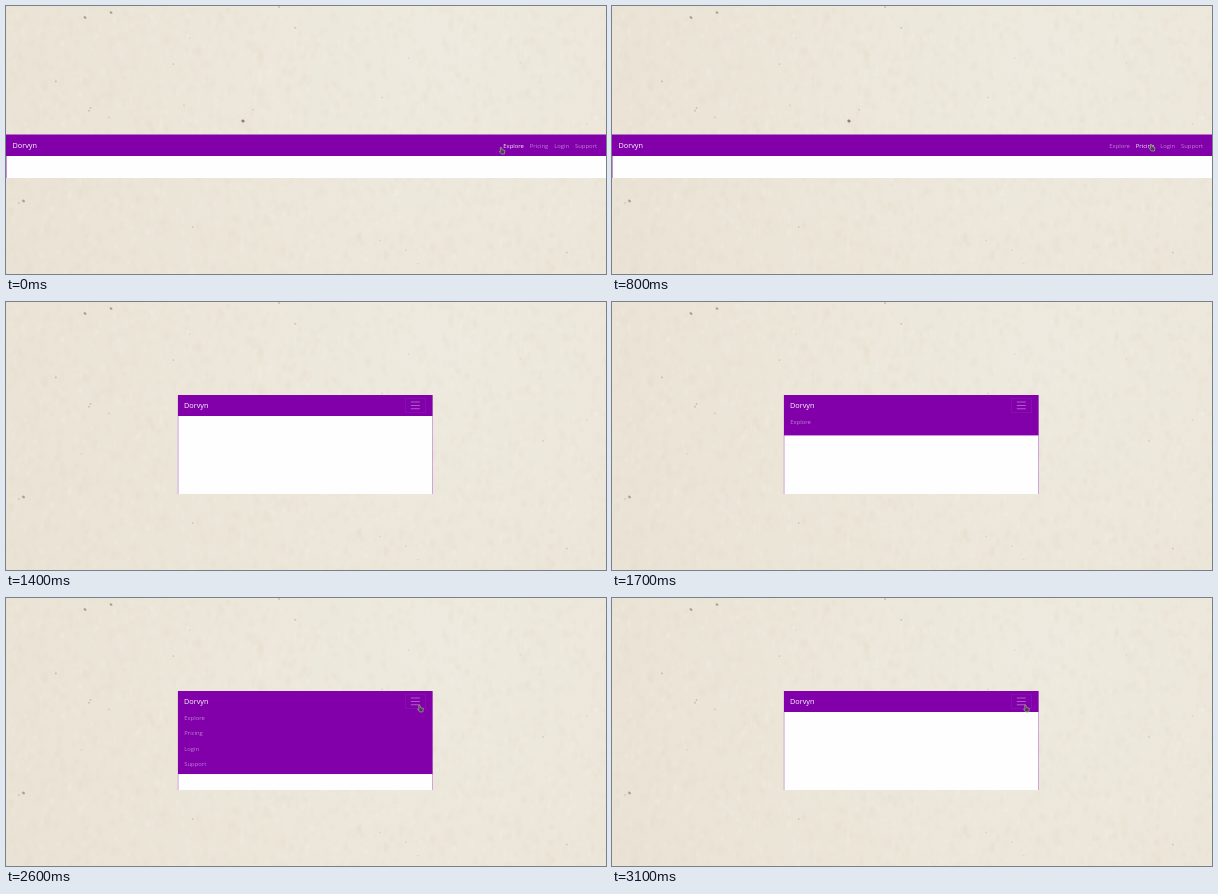
Recreate the animation shown at these times as an HTML page with a canvas. Size 600x268 px, loop 3.2 s.

```html
<!DOCTYPE html>
<html lang="en">
<head>
<meta charset="utf-8">
<title>Responsive navigation bar</title>
<style>
  html, body { margin: 0; width: 100%; height: 100%; overflow: hidden; background: #ece7da; }
  canvas { display: block; width: 600px; height: 268px; }
</style>
</head>
<body>
<canvas id="stage" width="600" height="268"></canvas>
<script>
const W = 600, H = 268, LOOP = 3200, STEP = 100;
const NARROW_AT = 1400, OPEN_AT = 1628, CLOSE_AT = 2590, COLLAPSE = 350, POINTER_AT = 1800;
const PURPLE = '#8200aa', BORDER = '#c691d5';
const FONT = '"Open Sans", "Noto Sans", sans-serif', LINK_SIZE = 5.85, LINK_GAP = 6;
const BRAND = 'Dorvyn', LINKS = ['Explore', 'Pricing', 'Login', 'Support'];
const ctx = document.getElementById('stage').getContext('2d');

const progress = (t, start, duration) => Math.max(0, Math.min(1, (t - start) / duration));

// CSS "ease" curve, solved by bisection
function ease(x) {
  const bezier = (a, b, s) => 3 * a * s * (1 - s) ** 2 + 3 * b * s * s * (1 - s) + s ** 3;
  let lo = 0, hi = 1;
  for (let i = 0; i < 20; i++) {
    const mid = (lo + hi) / 2;
    if (bezier(.25, .25, mid) < x) lo = mid; else hi = mid;
  }
  return bezier(.1, 1, lo);
}

function makePaper() {
  const canvas = document.createElement('canvas');
  canvas.width = W;
  canvas.height = H;
  const c = canvas.getContext('2d');
  let seed = 17;
  const random = () => (seed = (seed * 16807) % 2147483647) / 2147483647;

  const base = c.createRadialGradient(430, 50, 0, 430, 50, 460);
  base.addColorStop(0, '#eeeadf');
  base.addColorStop(.4, '#ece7da');
  base.addColorStop(1, '#eae3d5');
  c.fillStyle = base;
  c.fillRect(0, 0, W, H);

  c.filter = 'blur(1px)';
  for (let i = 0; i < 2500; i++) {
    c.fillStyle = random() < .5 ? 'rgba(222,211,193,.11)' : 'rgba(247,243,234,.13)';
    c.fillRect(random() * W, random() * H, 2 + random() * 3, 3 + random() * 6);
  }
  c.filter = 'none';

  const fleck = (x, y, radius, color) => {
    c.fillStyle = color;
    c.beginPath();
    c.ellipse(x, y, radius, radius * .85, .5, 0, 7);
    c.fill();
  };
  for (let i = 0; i < 24; i++) {
    fleck(random() * W, random() * H, .5 + random() * .6, `hsl(38, 20%, ${70 + random() * 12}%)`);
  }
  fleck(237, 115, 1.7, '#8d8070');
  fleck(79, 11.5, 1.5, '#aaa092');
  fleck(105, 6.5, 1.4, '#aaa092');
  fleck(17.5, 195, 1.5, '#aaa092');
  return canvas;
}

const paper = makePaper();

function rect(color, x, y, w, h) {
  ctx.fillStyle = color;
  ctx.fillRect(x, y, w, h);
}

function text(label, x, y, size, alpha) {
  ctx.font = `${size}px ${FONT}`;
  ctx.fillStyle = `rgba(255,255,255,${alpha})`;
  ctx.fillText(label, x, y);
}

function hand(x, y) {
  ctx.save();
  ctx.translate(x, y);
  ctx.lineJoin = 'round';
  ctx.beginPath();
  ctx.moveTo(-.8, 0);
  ctx.lineTo(.6, 0);
  ctx.lineTo(1, 2.2);
  ctx.lineTo(4, 3);
  ctx.lineTo(3.4, 6.5);
  ctx.lineTo(.3, 6.5);
  ctx.lineTo(-1.8, 3.8);
  ctx.lineTo(-.3, 3.8);
  ctx.closePath();
  ctx.fillStyle = '#51375a';
  ctx.strokeStyle = '#a29c8f';
  ctx.lineWidth = .8;
  ctx.fill();
  ctx.stroke();
  ctx.restore();
}

function drawWide(t) {
  const first = progress(t, 300, 500), second = progress(t, 800, 300);
  const px = 495 + 44 * first + 39 * second, py = 141.5 - 3 * first - .5 * second;
  rect('#fefefe', 0, 150, W, 22);
  rect(BORDER, 0, 150, 1, 22);
  rect(PURPLE, 0, 128.5, W, 21.5);
  text(BRAND, 6.5, 142.3, 7.3, 1);

  // Links are laid out from the right edge inwards
  ctx.font = `${LINK_SIZE}px ${FONT}`;
  let end = 591;
  for (const label of [...LINKS].reverse()) {
    const x = end - ctx.measureText(label).width;
    const hovered = Math.abs(px + 1 - (x + end) / 2) < (end - x + LINK_GAP) / 2;
    text(label, x, 141.8, LINK_SIZE, hovered ? .95 : .5);
    end = x - LINK_GAP;
  }
  hand(px, py);
}

function drawNarrow(t) {
  const open = ease(progress(t, OPEN_AT, COLLAPSE)) - ease(progress(t, CLOSE_AT, COLLAPSE));
  const left = 172, top = 93, width = 254.5, height = 99, navHeight = 21 + 63 * open;
  rect('#fefefe', left, top, width, height);
  rect(BORDER, left - .3, top, .8, height);
  rect(BORDER, left + width - .5, top, .8, height);
  rect(PURPLE, left, top, width, navHeight);
  text(BRAND, 178, 106.4, 7.3, 1);

  ctx.strokeStyle = 'rgba(255,255,255,.05)';
  ctx.strokeRect(399.5, 96.5, 20, 14);
  for (let i = 0; i < 3; i++) rect('rgba(255,255,255,.45)', 404.8, 99.6 + i * 3.4, 9, .8);

  ctx.save();
  ctx.beginPath();
  ctx.rect(left, top + 18, width, navHeight - 21);
  ctx.clip();
  LINKS.forEach((label, i) => text(label, 178.3, 121.6 + i * 15.6, LINK_SIZE, .5));
  ctx.restore();

  if (t >= POINTER_AT) hand(413.4, 107.4);
}

function frame(now) {
  const t = Math.floor((now % LOOP) / STEP) * STEP;
  ctx.drawImage(paper, 0, 0);
  if (t < NARROW_AT) drawWide(t); else drawNarrow(t);
  requestAnimationFrame(frame);
}
requestAnimationFrame(frame);
</script>
</body>
</html>
```
